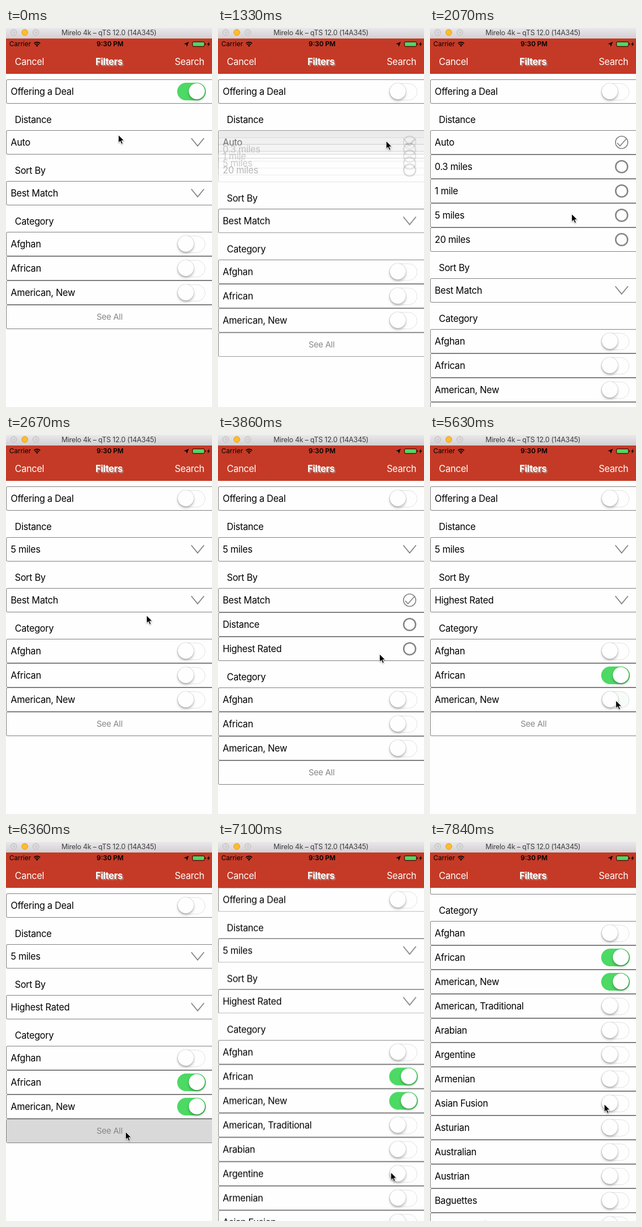
These frames come from a looping animation (373 by 686 pixels, 7990 ms). An HTML page:

```html
<!DOCTYPE html>
<html lang="en">
<head>
<meta charset="utf-8">
<title>Filters</title>
<style>
html, body { margin: 0; width: 100%; height: 100%; overflow: hidden; background: #fff; }
#stage { position: relative; width: 373px; height: 686px; overflow: hidden; background: #fefefe;
  font: 16.7px/1 Inter, Roboto, sans-serif; letter-spacing: -.3px; color: #000; white-space: nowrap; }
#stage div, #stage svg { position: absolute; box-sizing: border-box; }
svg { fill: none; stroke: #858585; overflow: visible; }
.row { left: 0; width: 376px; height: 44px; border: 1px solid #7d7d7d; border-radius: 3px; background: #fefefe; }
.row span { position: absolute; left: 7.5px; line-height: 42px; }
.row .all { left: 0; width: 373px; text-align: center; font-size: 15px; letter-spacing: -.25px; color: #868686; }
.row svg { left: 334px; top: 9px; width: 24px; height: 24px; }
.glow { inset: 0; background: #d9d9d9; opacity: 0; border-radius: 2px; }
.head { left: 16px; line-height: 20px; }
.switch { left: 309px; top: 5.5px; width: 51px; height: 31px; border-radius: 16px; background: #fefefe; border: 1.5px solid #e2e2e2; }
.green { inset: -1.5px; border-radius: 16px; background: #4cd964; opacity: 0; }
.knob { left: 0; top: -.5px; width: 29px; height: 29px; border-radius: 50%; background: #fefefe;
  box-shadow: 0 3px 4px rgba(0,0,0,.25), 0 0 1.5px rgba(0,0,0,.35); }
#window { left: 0; top: 0; width: 373px; height: 19px; background: linear-gradient(#e9e7e9, #d2d0d2);
  font-size: 12.6px; letter-spacing: -.2px; line-height: 17px; text-align: center; color: #3c3c3c; }
.light { top: 2px; width: 12px; height: 12px; border-radius: 50%; background: #dad8da; border: 1px solid #bfbdbf; }
.light::after { content: ""; position: absolute; inset: 3.5px; border-radius: 50%; background: #c9c7c9; }
.light.amber { background: #fdbc2e; border-color: #dfa023; }
.light.amber::after { content: none; }
#bar { left: 0; top: 19px; width: 373px; height: 64px; background: #c53a26; color: #fff; }
#bar div { line-height: 20px; }
#bar .status { top: 0; font-size: 12px; letter-spacing: 0; color: #000; }
#bar .nav { top: 32px; }
#bar svg { left: 0; top: 0; }
#cursor { left: 0; top: 0; width: 14px; height: 20px; filter: drop-shadow(0 1.5px 1px rgba(0,0,0,.35)); }
</style>
</head>
<body>
<div id="stage">
  <div id="list"></div>
  <div id="window">Mirelo 4k – qTS 12.0 (14A345)
    <div class="light" style="left:8px"></div>
    <div class="light amber" style="left:28px"></div>
    <div class="light" style="left:48px"></div>
  </div>
  <div id="bar">
    <div class="status" style="left:6px">Carrier</div>
    <div class="status" style="left:2px;width:373px;text-align:center;font-weight:600">9:30 PM</div>
    <svg width="373" height="64">
      <g stroke="#000" stroke-width="1.7">
        <path d="M50.5 9a8 8 0 0 1 11.4 0M52.6 11.3a5 5 0 0 1 7.2 0"/>
        <path d="M56.2 15l-2-2.3a3 3 0 0 1 4 0z" fill="#000" stroke="none"/>
      </g>
      <path d="M331 6l-3.6 9-1-4.3-4.4-1z" fill="#000" stroke="none"/>
      <rect x="337.5" y="6" width="22" height="8.6" rx="2" stroke="#000" stroke-width=".8"/>
      <rect x="338.5" y="7" width="20" height="6.6" rx="1" fill="#4cd964" stroke="none"/>
      <path d="M360.7 8.8v3q1.4-.4 1.4-1.5t-1.4-1.5z" fill="#000" stroke="none"/>
      <path d="M368.3 5.5l-4.3 5.4h2.4l-1.5 4.2 4.7-5.6h-2.6z" fill="#000" stroke="none"/>
    </svg>
    <div class="nav" style="left:16px">Cancel</div>
    <div class="nav" style="left:162px;font-weight:700;text-shadow:2px 2px 1.5px rgba(175,165,160,.85)">Filters</div>
    <div class="nav" style="right:14px">Search</div>
  </div>
  <svg id="cursor" viewBox="0 0 14 20">
    <path d="M.5 .5v14.2l3.3-3 2.3 5.4 2.5-1.1-2.3-5.1h4.6z" fill="#000" stroke="#fff" stroke-width="1"/>
  </svg>
</div>
<script>
const LOOP = 7990, ROW = 44;

function add(parent, cls, html = '', top) {
  const el = document.createElement('div');
  el.className = cls;
  el.innerHTML = html;
  if (top !== undefined) el.style.top = top + 'px';
  return parent.appendChild(el);
}

// stops: [ms, style, easing to the next stop]
function play(el, stops) {
  const all = [[0, stops[0][1]], ...stops, [LOOP, stops[stops.length - 1][1]]];
  el.animate(all.map(([ms, style, easing = 'linear']) => ({ offset: ms / LOOP, easing, ...style })),
    { duration: LOOP, iterations: Infinity });
}

// Runs style(p) from 0 to 1 at `on`, and back to 0 at `off` if given
function shift(el, style, on, off, span = 300) {
  const stops = [[on, style(0), 'ease-in-out'], [on + span, style(1)]];
  if (off) stops.push([off, style(1), 'ease-in-out'], [off + span, style(0)]);
  play(el, stops);
}

const moveY = y => ({ transform: `translateY(${y}px)` });
const fade = p => ({ opacity: p });
const fadeOut = p => ({ opacity: 1 - p });

const icon = body => `<svg viewBox="0 0 24 24">${body}</svg>`;
const CHEVRON = icon('<path d="M.5 4.5L12 18.5 23.5 4.5" stroke-width="1.9"/>');
const RING = icon('<circle cx="12" cy="12" r="10.8" stroke-width="2.6"/>');
const CHECK = icon('<circle cx="12" cy="12" r="11.2" stroke-width="1.6"/><path d="M4 13l5 5.5L20.5 5.5" stroke-width="1.8"/>');

function addRow(parent, top, text, extra = '', cls = '') {
  return add(parent, 'row', `<div class="glow"></div><span class="${cls}">${text}</span>${extra}`, top);
}

function press(row, on, off) {
  shift(row.querySelector('.glow'), fade, on, off, 1);
}

function addSwitch(parent, top, text, tap, startsOn = false) {
  const row = addRow(parent, top, text, '<div class="switch"><div class="green"></div><div class="knob"></div></div>');
  if (!tap) return row;
  const state = p => startsOn ? 1 - p : p;
  shift(row.querySelector('.green'), p => fade(state(p)), tap, 0, 220);
  shift(row.querySelector('.knob'), p => ({ transform: `translateX(${20 * state(p)}px)` }), tap, 0, 220);
  return row;
}

// A picker that unfolds into its options; returns the group that it pushes down
function addPicker(parent, top, title, options, picked, open, close) {
  add(parent, 'head', title, top - 29);
  const before = addRow(parent, top, options[0], CHEVRON);
  const after = addRow(parent, top, options[picked], CHEVRON);
  press(before, open - 130, open + 400);
  shift(before, fadeOut, open);
  shift(after, fade, close);
  options.forEach((text, i) => {
    const row = addRow(parent, top, text, i ? RING : CHECK);
    shift(row, p => ({ ...fade(p), ...moveY(ROW * i * p) }), open, close);
    if (i === picked) press(row, close - 200, close + 350);
  });
  const below = add(parent, '', '', 0);
  below.style.left = 0;
  shift(below, p => moveY(ROW * (options.length - 1) * p), open, close);
  return below;
}

const list = document.getElementById('list');
addSwitch(list, 93, 'Offering a Deal', 610, true);
const sort = addPicker(list, 185, 'Distance',
  ['Auto', '0.3 miles', '1 mile', '5 miles', '20 miles'], 3, 1220, 2300);
const category = addPicker(sort, 277, 'Sort By',
  ['Best Match', 'Distance', 'Highest Rated'], 2, 3370, 4240);

const SEE_ALL = 6440;
add(category, 'head', 'Category', 340);
addSwitch(category, 369, 'Afghan');
addSwitch(category, 413, 'African', 5100);
addSwitch(category, 457, 'American, New', 5600);
const all = addRow(category, 501, 'See All', '', 'all');
press(all, 6250, SEE_ALL + 400);
shift(all, fadeOut, SEE_ALL);
['American, Traditional', 'Arabian', 'Argentine', 'Armenian', 'Asian Fusion', 'Asturian',
  'Australian', 'Austrian', 'Baguettes', 'Bangladeshi'].forEach((text, i) => {
  const row = addSwitch(category, 501, text);
  shift(row, p => ({ ...fade(p), ...moveY(ROW * i * p) }), SEE_ALL);
});

play(list, [[7020, moveY(0), 'ease-in'], [7200, moveY(-40)], [7480, moveY(-140), 'ease-out'], [7840, moveY(-226)]]);

play(document.getElementById('cursor'), [
  [120, 203, 193], [540, 336, 114], [760, 336, 114], [1080, 304, 204], [1400, 304, 204],
  [2060, 256, 336], [2420, 256, 336], [2670, 254, 326], [2800, 256, 322], [3180, 290, 301], [3480, 290, 301],
  [3860, 292, 396], [4000, 292, 390], [4380, 290, 388], [4610, 278, 382], [5020, 335, 436],
  [5220, 335, 436], [5500, 336, 480], [5720, 336, 480], [6220, 216, 524], [6560, 216, 524],
  [6960, 312, 614], [7020, 312, 614], [7200, 313, 574], [7480, 315, 474]
].map(([ms, x, y]) => [ms, { transform: `translate(${x}px, ${y}px)` }, 'ease-in-out']));
</script>
</body>
</html>
```
